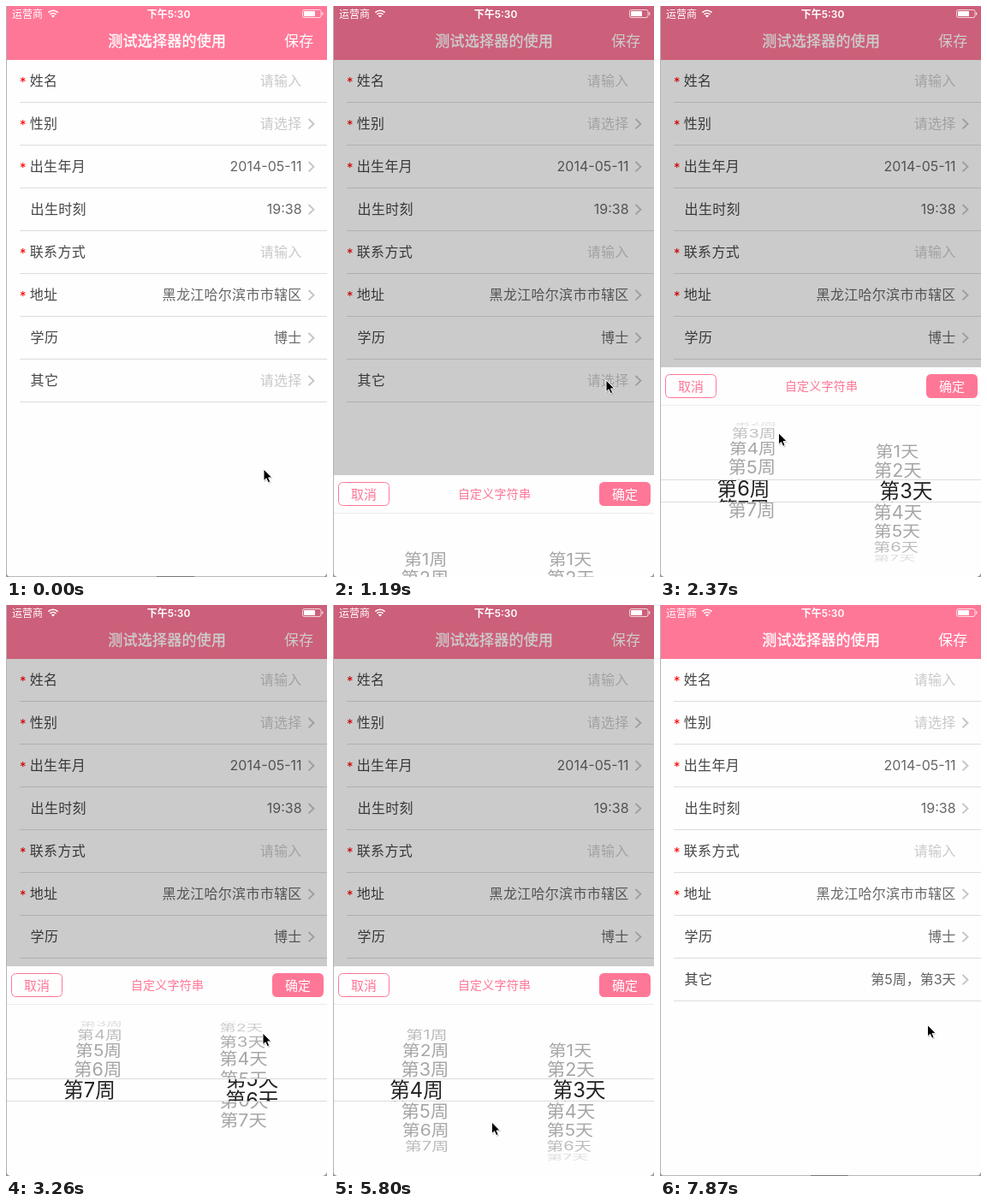
These frames come from a looping animation (375x667 px, 8 s). An HTML page:

```html
<!DOCTYPE html>
<html lang="zh-CN">
<head>
<meta charset="utf-8">
<title>测试选择器的使用</title>
<style>
  html, body { margin: 0; width: 100%; height: 100%; overflow: hidden; background: #fefefe; }
  svg { display: block; width: 375px; height: 667px; }
  text { font-family: Inter, "Noto Sans CJK SC", "Noto Sans CJK", sans-serif; font-size: 16px; }
  .mid { text-anchor: middle; }
  .end { text-anchor: end; }
  .label { fill: #454545; letter-spacing: .3px; }
  .value { fill: #666; }
  .cjk { letter-spacing: .3px; }
  .hint { fill: #c9c9cb; letter-spacing: .3px; }
  .star { fill: #f00; font-size: 15px; }
  .status { font-size: 12px; fill: #fff; }
  .title { font-size: 17px; fill: #fff; stroke: #fff; stroke-width: .35px; letter-spacing: .25px; }
  .btn { font-size: 15px; }
  .pink { fill: #ff7797; }
  .far { font-size: 21.7px; fill: #a6a6a6; }
  .near { font-size: 23.7px; fill: #222; }
</style>
</head>
<body>
<svg viewBox="0 0 375 667">
  <defs>
    <clipPath id="band"><rect y="132" width="375" height="25.5"/></clipPath>
    <clipPath id="around"><path d="M0 64H375V131H0ZM0 158H375V245H0Z"/></clipPath>
  </defs>

  <rect width="375" height="667" fill="#fefefe"/>
  <rect width="375" height="63" class="pink"/>
  <text x="188.2" y="47" class="title mid">测试选择器的使用</text>
  <text x="325" y="47" class="cjk" style="font-size:17px" fill="#fff">保存</text>
  <g id="form"></g>
  <path d="M4 666.5H371" stroke="#b8b8b8"/>
  <path d="M176 666.5H220" stroke="#777"/>

  <rect id="dim" width="375" height="667"/>

  <text x="7" y="13.5" class="status">运营商</text>
  <path d="M49.4 7.6A8 8 0 0 1 60.6 7.6M51.5 9.9A5 5 0 0 1 58.5 9.9" fill="none" stroke="#fff" stroke-width="1.6"/>
  <path d="M55 13.6L52.9 11.5A3 3 0 0 1 57.1 11.5Z" fill="#fff"/>
  <text x="190" y="13.5" class="status mid" font-weight="600">下午5:30</text>
  <rect x="346.5" y="4.5" width="21.5" height="9" rx="2" fill="none" stroke="#fff" stroke-opacity=".75"/>
  <rect x="348" y="6" width="13" height="6" rx=".6" fill="#fff"/>
  <rect x="369" y="7.3" width="1.4" height="3.4" rx=".7" fill="#fff" fill-opacity=".75"/>

  <g id="panel">
    <rect width="375" height="246" fill="#fefefe"/>
    <path d="M0 44.5H375" stroke="#ececec"/>
    <rect x="6.5" y="8.5" width="59" height="27" rx="5" fill="none" stroke="#ff7797"/>
    <text x="36" y="27.8" class="btn mid pink">取消</text>
    <text x="188.5" y="27.2" class="mid pink" style="font-size:14px;letter-spacing:.2px">自定义字符串</text>
    <rect x="311" y="8" width="60" height="28" rx="5.5" class="pink"/>
    <text x="341" y="27.8" class="btn mid" fill="#fff">确定</text>
    <path d="M0 131.5H375M0 157.5H375" stroke="#dcdcdc"/>
    <g id="far" clip-path="url(#around)"></g>
    <g id="near" clip-path="url(#band)"></g>
  </g>

  <path d="M.5 0V667" stroke="#b4b4b4"/>
  <path d="M0 662V667H5Q1 666 0 662ZM375 662V667H370Q374 666 375 662Z" fill="#999"/>

  <g id="cursor">
    <path d="M1 1.5V15L4 12.3L6 17L8.6 16L6.5 11.3H10.6Z" opacity=".22"/>
    <path d="M0 0V13.6L3.1 10.8L5.2 15.7L7.7 14.6L5.6 9.9H9.8Z" stroke="#fff" stroke-linejoin="round"/>
  </g>
</svg>

<script>
const $ = id => document.getElementById(id);

function add(parent, tag, attrs, content) {
  const el = document.createElementNS('http://www.w3.org/2000/svg', tag);
  for (const k in attrs) el.setAttribute(k, attrs[k]);
  if (content) el.textContent = content;
  parent.append(el);
  return el;
}

// A leading star marks a required row.
const rows = [
  ['*姓名', '请输入'],
  ['*性别', '请选择'],
  ['*出生年月', '2014-05-11'],
  ['出生时刻', '19:38'],
  ['*联系方式', '请输入'],
  ['*地址', '黑龙江哈尔滨市市辖区'],
  ['学历', '博士'],
  ['其它', '请选择']
];
let other;
rows.forEach(([label, value], i) => {
  const y = 87.5 + i * 50, form = $('form'), must = label[0] === '*';
  if (must) add(form, 'text', { x: 16, y: y + 6.5, class: 'star' }, '*');
  add(form, 'text', { x: must ? 27.8 : 28.6, y: y + 5.8, class: 'label' }, label.replace('*', ''));
  const kind = value[0] === '请' ? 'hint' : /\d/.test(value) ? 'value' : 'value cjk';
  other = add(form, 'text', { x: 345.6, y: y + 5.8, class: 'end ' + kind }, value);
  if (value !== '请输入') add(form, 'path', {
    d: `M353.5 ${y - 5.5}l6 5.7l-6 5.7`, fill: 'none', stroke: '#c5c5c9', 'stroke-width': 1.9
  });
  add(form, 'path', { d: `M16 ${y + 25}H375`, stroke: '#dcdcdc' });
});

const TICK = 148.5, LOOP = 8000;
const OPEN = 7.02, CLOSE = 48.71, SLIDE = 2;

// Pointer moves; those with week or day drag that wheel by so many items.
const moves = [
  { at: 1, len: 5, x: 319, y: 437 },
  { at: 9, len: 3, x: 130, y: 603 },
  { at: 12, len: 4.7, x: 139, y: 492, week: 4 },
  { at: 17, len: 1, x: 305, y: 593 },
  { at: 19, len: 3, x: 300, y: 500, day: 3 },
  { at: 22, len: 2, x: 103, y: 530 },
  { at: 25, len: 3, x: 176.5, y: 607, week: -3 },
  { at: 29, len: 2, x: 300, y: 510 },
  { at: 31, len: 3, x: 308, y: 642, day: -3 },
  { at: 36, len: 3, x: 185.5, y: 604 },
  { at: 39, len: 2, x: 130, y: 600 },
  { at: 41, len: 2.5, x: 134, y: 556, week: 1 },
  { at: 44, len: 4, x: 352, y: 449 },
  { at: 50, len: 2, x: 326, y: 518 },
  { at: 52, len: 1, x: 312.5, y: 490.5 }
];

function ease(x) {
  x = Math.max(0, Math.min(1, x));
  return x * x * (3 - 2 * x);
}

function pointer(n) {
  let x = 301, y = 541;
  for (const m of moves) {
    const k = ease((n - m.at) / m.len);
    x += (m.x - x) * k;
    y += (m.y - y) * k;
  }
  return `translate(${x} ${y})`;
}

// Wheels start on item 3 and coast one tick longer than the drag.
function position(wheel, n) {
  return moves.reduce((p, m) => p + (m[wheel] || 0) * ease((n - m.at) / (m.len + 1)), 3);
}

function makeWheel(name, unit, side) {
  const items = Array.from({ length: 7 }, (_, i) => ({
    far: add($('far'), 'text', { y: 7.8, class: 'far mid' }, `第${i + 1}${unit}`),
    near: add($('near'), 'text', { x: 192.5 + side * 95, class: 'near mid' }, `第${i + 1}${unit}`)
  }));
  return n => {
    const pos = position(name, n);
    items.forEach(({ far, near }, i) => {
      const a = (i + 1 - pos) * 0.292, c = Math.cos(a);
      const y = 145 + 85 * Math.sin(a), tilt = 1 - c;
      const x = 192.5 + side * 85.5 * (1 - 0.08 * tilt);
      far.setAttribute('transform', `translate(${x} ${y}) scale(${1 - 0.2 * tilt} ${Math.max(c, 0.01)})`);
      far.setAttribute('opacity', Math.max(0, Math.min(1, c * 1.5 - 0.2)));
      near.setAttribute('y', y + 8.1);
      near.setAttribute('opacity', Math.abs(a) < 0.6 ? 1 : 0);
    });
  };
}
const wheels = [makeWheel('week', '周', -1), makeWheel('day', '天', 1)];

function draw(now) {
  const n = Math.floor((now % LOOP + 8) / TICK);
  const hide = ease((n - CLOSE) / SLIDE);
  const up = ease((n - OPEN) / SLIDE) - hide;
  $('panel').setAttribute('transform', `translate(0 ${Math.round(667 - 245 * up)})`);
  $('panel').setAttribute('visibility', up > 0 ? 'visible' : 'hidden');
  $('dim').setAttribute('opacity', n >= 7 ? 0.2 * (1 - hide) : 0);

  const done = n >= CLOSE;
  other.textContent = done ? '第5周，第3天' : '请选择';
  other.setAttribute('class', done ? 'end value' : 'end hint');

  wheels.forEach(turn => turn(n));
  $('cursor').setAttribute('transform', pointer(n));
}

function loop() {
  draw(performance.now());
  requestAnimationFrame(loop);
}
loop();
</script>
</body>
</html>
```
